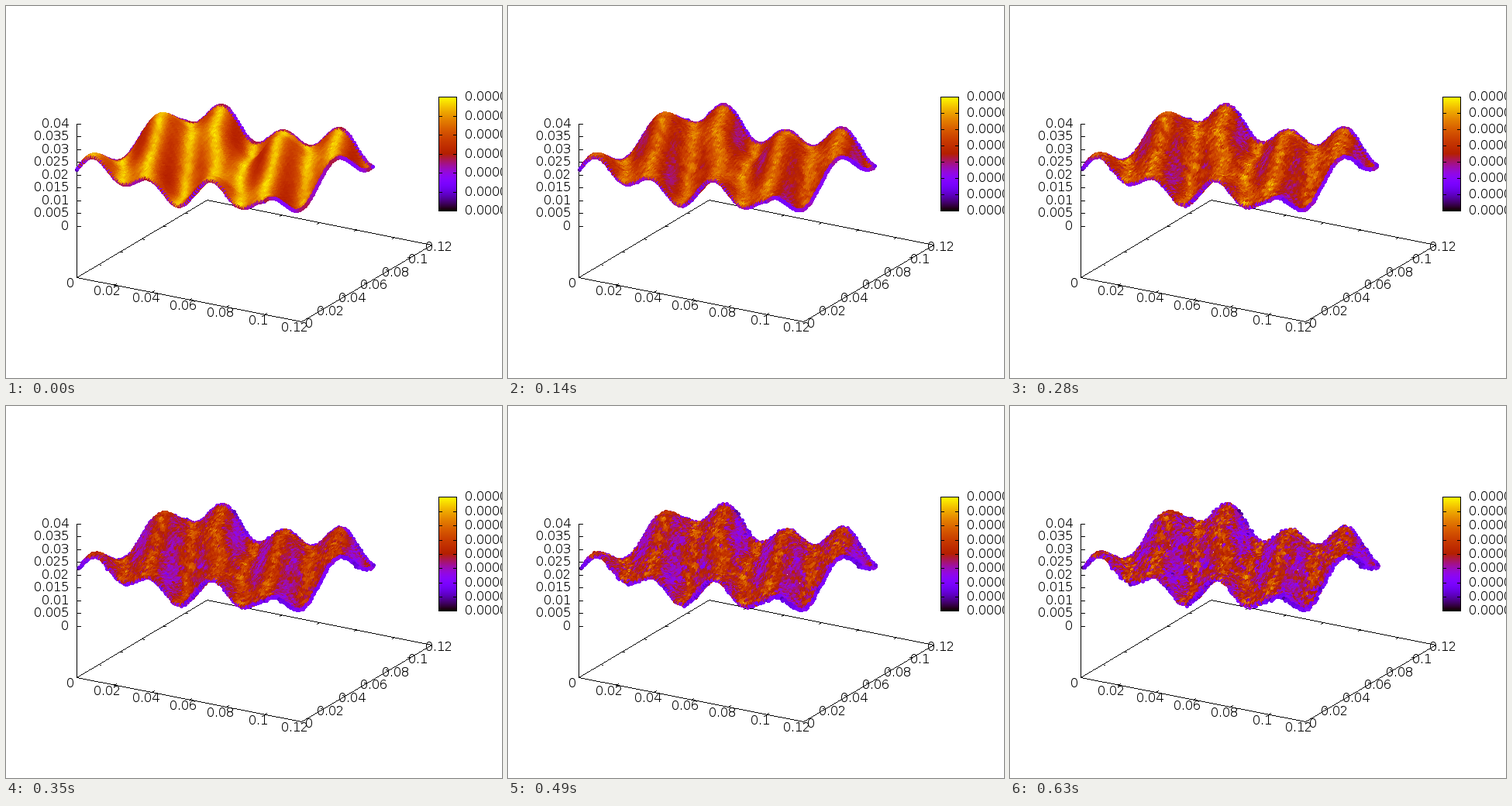
Write a matplotlib script that moves like this. It is 640 px wide and 480 px high and loops after 0.7 s.

```python
import numpy as np
import matplotlib.pyplot as plt
from matplotlib.animation import FuncAnimation

W, H, FRAMES, STEP = 640, 480, 10, 70
plt.rcParams.update({
    "font.family": "DejaVu Sans", "font.size": 11.52,
    "text.hinting": "default", "text.hinting_factor": 1,
})

fig = plt.figure(figsize=(W / 100, H / 100), dpi=100, facecolor="white")
ax = fig.add_axes([0, 0, 1, 1])
ax.axis("off")
stage = ax.imshow(np.ones((H, W, 3)), extent=(0, W, H, 0), aspect="auto",
                  interpolation="nearest")
ax.set_xlim(0, W)
ax.set_ylim(H, 0)


def snap(v):
    return np.floor(np.asarray(v) + 0.5).astype(int)


def project(x, y, z=0.0):
    """Plot coordinates to stage pixels."""
    sx = 91 + x * 290 / 0.12 + y * 168 / 0.12
    sy = 284 + x * 57.25 / 0.12 - y * 99.75 / 0.12 - z * 3300
    return sx, sy


def floor_point(x, y):
    return np.array(project(x, y, -0.02))


def palette(v):
    """Black - violet - red - yellow ramp."""
    v = np.clip(v, 0, 1)
    rgb = np.stack([np.sqrt(v), v ** 3, np.sin(2 * np.pi * v)], -1)
    return np.clip(rgb, 0, 1)


def line(img, p, q):
    """One-pixel line without smoothing."""
    p, q = snap(p), snap(q)
    t = np.linspace(0, 1, abs(q - p).max() + 1)[:, None]
    x, y = snap(p + t * (q - p)).T
    img[y, x] = 0


def label(x, base, text, ha="center"):
    return ax.text(x, base, text, ha=ha, va="baseline", color="black")


# Box base, z axis and their ticks
back = np.ones((H, W, 3))
corners = [floor_point(0, 0), floor_point(0.12, 0),
           floor_point(0.12, 0.12), floor_point(0, 0.12)]
for k in range(4):
    line(back, corners[k], corners[(k + 1) % 4])
line(back, (91, 152), (91, 350))

tick_x, tick_y = np.array([3, 0.6]), np.array([3, -1.8])
for k in range(7):
    v = 0.02 * k
    text = f"{v:.2g}"
    if 0 < k < 6:
        for p, d in ((floor_point(v, 0), tick_y),
                     (floor_point(v, 0.12), -tick_y),
                     (floor_point(0, v), tick_x),
                     (floor_point(0.12, v), -tick_x)):
            line(back, p, p + d)
    px, py = floor_point(v, 0), floor_point(0.12, v)
    label(np.floor(px[0] - 7.5), snap(px[1] + 13), text)
    label(np.floor(py[0] + 10), snap(py[1] + 8), text)

for k in range(9):
    y = int(284 - 16.5 * k)
    line(back, (91, y), (96, y))
    label(81, y + 5, f"{0.005 * k:.3g}", "right")

# Colour bar
X0, X1, Y0, Y1 = 558, 581, 117, 264
back[Y0:Y1, X0:X1] = palette(np.linspace(1, 0, Y1 - Y0))[:, None]
for y in (Y0, Y1):
    line(back, (X0, y), (X1, y))
for x in (X0, X1):
    line(back, (x, Y0), (x, Y1))
bar_labels = [label(592, Y0, "0.0000", "left") for _ in range(9)]

# Particle sheet: heights, and density falling with slope and at the rim
N = 101
rng = np.random.default_rng(7)
axis = np.linspace(0, 0.1, N)
gx, gy = np.meshgrid(axis, axis, indexing="ij")
wave = 200 * gx + 100 * gy
gz = (0.02 + 0.004 * np.sin(wave) + 0.003 * np.sin(100 * gx)
      + 0.002 * np.cos(100 * gy))
dzx = 0.8 * np.cos(wave) + 0.3 * np.cos(100 * gx)
dzy = 0.4 * np.cos(wave) - 0.2 * np.sin(100 * gy)
rim = np.ones(N)
rim[[0, -1]], rim[[1, -2]] = 0.5, 0.92
density = (1 + dzx ** 2 + dzy ** 2) ** -0.66 * np.outer(rim, rim)
base_x, base_y = project(gx, gy, gz)


def grain():
    n = rng.normal(size=(N, N))
    near = sum(np.roll(n, s, a) for s in (1, -1) for a in (0, 1))
    return (n + 0.5 * near) / np.sqrt(2)


vel_x, vel_y = rng.normal(0, 0.1, (2, N, N))
grain_a, grain_b = grain(), grain()

# Round marker, five pixels across
dx, dy = np.meshgrid(np.arange(-2, 3), np.arange(-2, 3))
disc = dx ** 2 + dy ** 2 < 8
mark_x, mark_y = dx[disc], dy[disc]


def draw(i):
    parts = 6 if i == 0 else 7 if i < 5 else 8
    img = back.copy()

    # Particles drift apart
    px = snap(base_x + (vel_x + 0.38) * i)
    py = snap(base_y + (vel_y - 0.2) * i)
    turn = 0.08 * i
    noise = grain_a * np.cos(turn) + grain_b * np.sin(turn)
    level = 5.6 / parts * (1 - 0.015 * i)
    value = density * level * (1 + (0.02 + 0.019 * i) * noise)

    # Later particles cover earlier ones
    rgb = palette(np.clip(value, 0.03, 1)).reshape(-1, 3)
    cols = px.reshape(-1, 1) + mark_x
    rows = py.reshape(-1, 1) + mark_y
    img[rows.ravel(), cols.ravel()] = np.repeat(rgb, len(mark_x), axis=0)

    # Colour bar scale
    ys = np.ceil(np.linspace(Y1, Y0, parts + 1))
    for y in ys[1:-1]:
        line(img, (X0, y), (X0 + 4, y))
        line(img, (X1 - 4, y), (X1, y))
    for k, t in enumerate(bar_labels):
        t.set_visible(k <= parts)
        t.set_y(ys[min(k, parts)] + 5)

    stage.set_data(img)
    return [stage, *bar_labels]


ani = FuncAnimation(fig, draw, frames=FRAMES, interval=STEP,
                    init_func=lambda: draw(0), repeat=True, repeat_delay=0)
plt.show()
```
